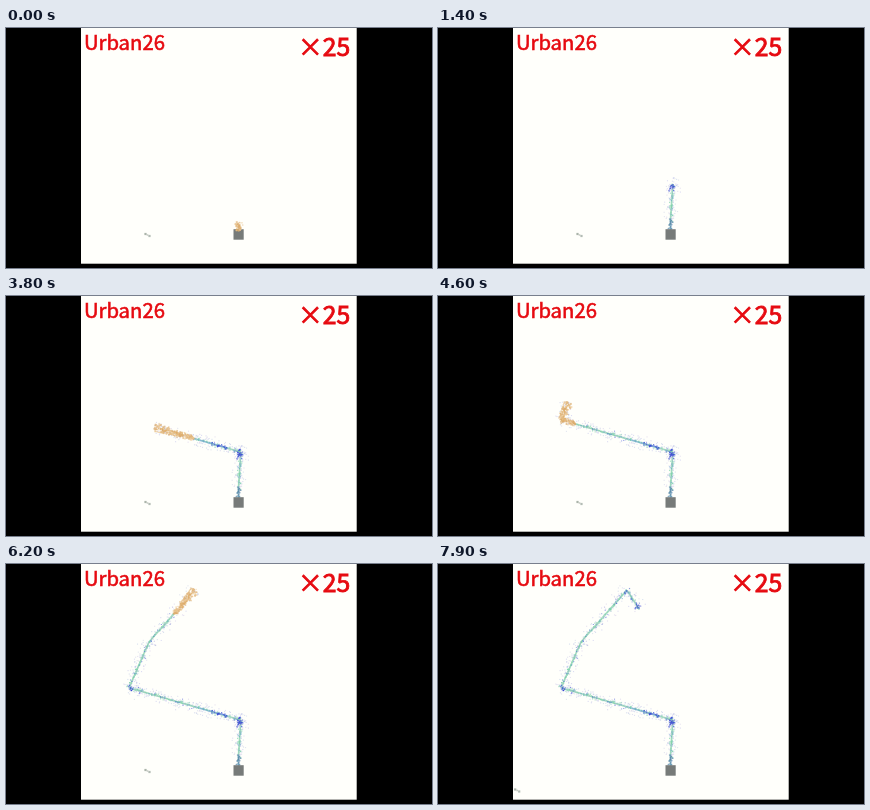
An HTML page with a canvas for the animation above (8000 ms loop, 426x240 px).

```html
<!DOCTYPE html>
<html lang="en">
<head>
<meta charset="utf-8">
<title>Urban26 trajectory</title>
<style>
html, body { margin: 0; width: 100%; height: 100%; overflow: hidden; background: #000; }
#stage { position: relative; width: 426px; height: 240px; overflow: hidden; background: #000; }
canvas, svg { position: absolute; left: 0; top: 0; }
text {
  font-family: "Noto Sans CJK JP", "Noto Sans CJK", "Noto Sans", sans-serif;
  fill: #e60a10; stroke: #e60a10; stroke-width: .6;
}
</style>
</head>
<body>
<div id="stage">
  <canvas id="map" width="426" height="240"></canvas>
  <svg width="426" height="240">
    <text x="77.9" y="22" font-size="20.3">Urban26</text>
    <text x="292" y="27.6" font-size="24.7" style="stroke-width:.9">×25</text>
  </svg>
</div>
<script>
const ctx = document.getElementById('map').getContext('2d');
const LOOP = 8000, STEP = 100;

const route = [[232.5, 203], [232.5, 192], [234.8, 156], [123, 123.8], [143, 78], [189, 26], [201, 45]];
const starts = [0];
for (let i = 1; i < route.length; i++) {
  starts.push(starts[i - 1] + Math.hypot(route[i][0] - route[i - 1][0], route[i][1] - route[i - 1][1]));
}
const total = starts[starts.length - 1];

// time, end of the settled trail, end of the live scan (distance along the route)
const keys = [
  [0, 0, 9], [600, 10, 36], [900, 24, 47], [1200, 47, 47], [2250, 47, 47], [2800, 47, 74],
  [3800, 96, 137], [5400, 201, 228], [6200, 251, 283], [6500, 266, 287],
  [6900, 282, 298], [7300, 296, 305], [7600, 306, 306], [8000, 306, 306]
];

function rng(seed) {
  return () => {
    seed = (seed * 1664525 + 1013904223) >>> 0;
    return seed / 4294967296;
  };
}

// point at distance s, moved sideways by off
function at(s, off = 0) {
  let i = 1;
  while (i < route.length - 1 && s > starts[i]) i++;
  const [ax, ay] = route[i - 1], [bx, by] = route[i];
  const len = starts[i] - starts[i - 1];
  const ux = (bx - ax) / len, uy = (by - ay) / len, d = s - starts[i - 1];
  return [ax + ux * d - uy * off, ay + uy * d + ux * off];
}

function progress(t) {
  let i = 1;
  while (i < keys.length - 1 && t > keys[i][0]) i++;
  const a = keys[i - 1], b = keys[i], f = (t - a[0]) / (b[0] - a[0]);
  return [a[1] + (b[1] - a[1]) * f, a[2] + (b[2] - a[2]) * f];
}

const rand = rng(26);
const bell = () => rand() + rand() + rand() - 1.5;
const pick = list => list[Math.floor(rand() * list.length)];

const dots = [];
function scatter(n, from, to, spread, size, alpha, colors) {
  for (let i = 0; i < n; i++) {
    const s = from + rand() * (to - from);
    const [x, y] = at(s, bell() * spread);
    dots.push({ s, x, y, size, alpha, color: pick(colors) });
  }
}
const pale = ['#9a9ae0', '#a9b4dc', '#b5a8dc', '#8fa6d8'];
const core = ['#5fcf96', '#6fc7a8', '#7ccfa0', '#5f9fc4', '#6f98d8'];
const blue = ['#2433cf', '#3c50dc', '#4a62c8'];
scatter(520, 12, total, 7, 1.1, .34, pale);
scatter(260, 2, total, 2, 1.2, .55, core);
scatter(60, 46, total, 4, 1, .55, blue);
scatter(22, 2, 12, 2.4, 1.4, .6, ['#5a8fb0', '#5d86a8']);
scatter(26, 40, 50, 3.4, 1.3, .75, blue);
scatter(20, 62, 78, 2, 1.3, .65, blue);
scatter(10, 159, 166, 3.5, 1.2, .65, blue);
scatter(6, 278, 285, 3.5, 1.2, .6, blue);
scatter(10, 300, 305, 2.5, 1.3, .65, blue);
for (let i = 0; i < 22; i++) {
  const a = rand() * 6.28, r = 2 + rand() * 6;
  dots.push({ s: 43, x: 236 + Math.cos(a) * r, y: 157 + Math.sin(a) * r, size: 1.1, alpha: .32, color: pick(pale) });
}

const scan = Array.from({ length: 280 }, () => ({
  f: rand(), off: bell() * 2, size: 1 + rand() * .9, color: pick(['#e0ad68', '#e6bd82', '#d9a768', '#edcc9c'])
}));

function dot(x, y, size, color, alpha) {
  ctx.globalAlpha = alpha;
  ctx.fillStyle = color;
  ctx.fillRect(x - size / 2, y - size / 2, size, size);
}

function trail(end) {
  ctx.globalAlpha = .8;
  ctx.lineWidth = 1.7;
  for (let s = 0; s < end; s += 3) {
    const mid = Math.min(s + 3, end);
    ctx.strokeStyle = s < 12 ? '#6fa3b8' : s > 41 && s < 48 ? '#5a6cd8' : s > 58 && s < 92 ? '#69a9c8' : '#86d0ae';
    ctx.beginPath();
    ctx.moveTo(...at(s));
    ctx.lineTo(...at(mid));
    ctx.stroke();
  }
}

function liveScan(tail, tip) {
  const len = tip - tail;
  if (len < 1) return;
  const n = Math.min(scan.length, len * 7);
  for (let i = 0; i < n; i++) {
    const p = scan[i];
    const [x, y] = at(tail + p.f * len, p.off * (1 + p.f * 1.3));
    dot(x, y, p.size, p.color, .6);
  }
}

function rock(x, y) {
  dot(x, y, 2.2, '#7f8c80', .65);
  dot(x + 2, y + 1, 1.6, '#a3aaa0', .6);
  dot(x + 4, y + 2, 2.2, '#8b9891', .65);
}

function draw(t) {
  const [tail, tip] = progress(t);
  ctx.clearRect(0, 0, 426, 240);
  ctx.globalAlpha = 1;
  ctx.fillStyle = '#fffffb';
  ctx.fillRect(75, 0, 275.7, 235.7);

  if (t < 7600) rock(139.5, 206);
  else rock(77.2, 225.5);

  trail(tail);
  for (const d of dots) {
    const faint = d.alpha < .4;
    if (d.s <= (faint ? tip : tail)) dot(d.x, d.y, d.size, d.color, d.alpha);
  }
  ctx.globalAlpha = 1;
  ctx.fillStyle = '#777b79';
  ctx.fillRect(227.5, 201.2, 10.2, 10.5);
  liveScan(tail, tip);
  ctx.globalAlpha = 1;
}

const t0 = performance.now();
function frame() {
  const t = (performance.now() - t0) % LOOP;
  draw(Math.floor(t / STEP) * STEP);
  requestAnimationFrame(frame);
}
draw(0);
requestAnimationFrame(frame);
</script>
</body>
</html>
```
